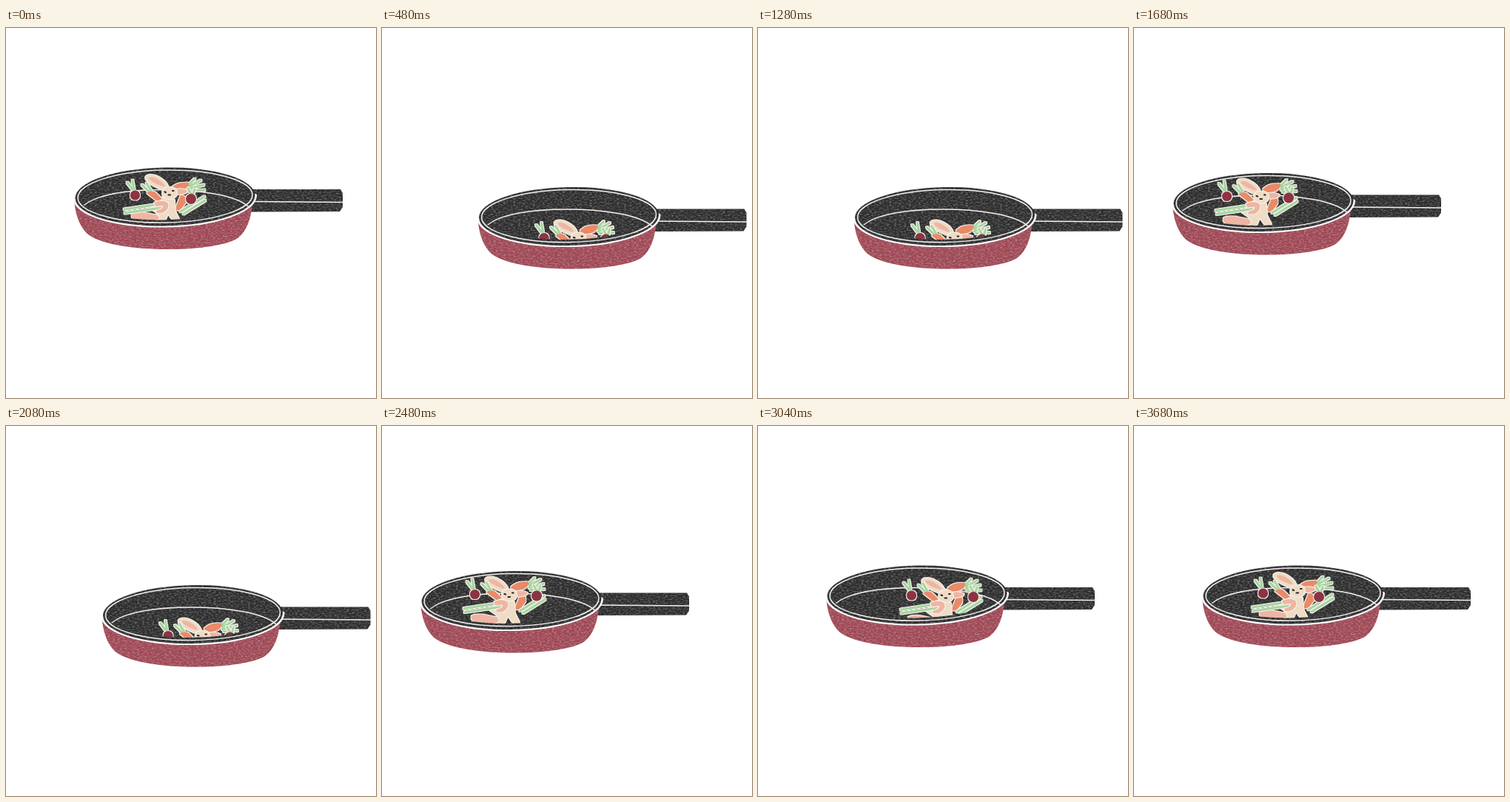
Recreate the animation shown at these times as an HTML page. Size 500 by 500 pixels, loop 3.76 s.

```html
<!DOCTYPE html>
<html lang="en">
<head>
<meta charset="utf-8">
<title>Rabbit stir-fry</title>
<style>
html, body { margin: 0; width: 100%; height: 100%; overflow: hidden; background: #fff; }
svg { display: block; width: 100vw; height: 100vh; }
path { stroke-linecap: round; stroke-linejoin: round; }
.chalk { fill: none; stroke: #f1efed; stroke-width: 1.5; }
.dark { fill: #2b2b2c; }
.cream { fill: #eedcc6; }
.pink { fill: #efb5a3; }
.orange { fill: #e98a69; }
.beet { fill: #8c3344; }
.stem { fill: none; stroke: #a5d5a2; stroke-width: 3; }
.ink { fill: none; stroke: #2a2523; stroke-width: 2.2; }
.cut { filter: url(#cut); }
</style>
</head>
<body>
<svg viewBox="0 0 500 500">
  <defs>
    <filter id="pencil" filterUnits="userSpaceOnUse" x="80" y="180" width="390" height="130" color-interpolation-filters="sRGB">
      <feTurbulence type="fractalNoise" baseFrequency=".3 .6" numOctaves="3" seed="8" result="grain"/>
      <feColorMatrix in="grain" values="0 0 0 0 1  0 0 0 0 1  0 0 0 0 1  .7 0 0 0 -.28" result="light"/>
      <feDisplacementMap in="SourceGraphic" in2="grain" scale="1.2" xChannelSelector="R" yChannelSelector="G" result="shape"/>
      <feComposite in="light" in2="shape" operator="in" result="marks"/>
      <feMerge><feMergeNode in="shape"/><feMergeNode in="marks"/></feMerge>
    </filter>
    <filter id="cut" filterUnits="userSpaceOnUse" x="140" y="180" width="150" height="100" color-interpolation-filters="sRGB">
      <feMorphology in="SourceAlpha" operator="dilate" radius="1" result="wide"/>
      <feFlood flood-color="#f5f0e6"/>
      <feComposite in2="wide" operator="in" result="edge"/>
      <feMerge><feMergeNode in="edge"/><feMergeNode in="SourceGraphic"/></feMerge>
    </filter>
    <clipPath id="inside">
      <path d="M60 120H375V225L332 225.500A117.500 35 -1 0 1 98 229.500L60 230Z"/>
    </clipPath>
  </defs>

  <g id="pan">
    <g filter="url(#pencil)">
      <path class="dark" d="M331 218L452 218L455 223V242L451 248L331 248.500Z"/>
      <path class="chalk" d="M333 234.500L455 235.500"/>
      <path fill="#9d4653" d="M92.500 236C94 252 100 272 114 281C133 293 174 299 219 299C263 299 299 293 313 284C326 274 331 257 333 238Z"/>
      <path fill="none" stroke="#fff" stroke-width="4" d="M337 226A122 39.500 -1 0 1 93 230"/>
      <ellipse cx="215" cy="228" rx="121.500" ry="39.500" transform="rotate(-1 215 228)" class="dark"/>
      <ellipse cx="215" cy="227.500" rx="118" ry="35.500" transform="rotate(-1 215 227.500)" class="chalk"/>
      <path class="chalk" d="M106 239C126 224 169 218.500 213 218.500S309 225 327 241"/>
    </g>

    <g clip-path="url(#inside)">
      <g id="food">
        <g class="cut">
          <path class="stem" d="M247 212L255 204M248 214L263 206M248 217L267 212M250 220L268 219"/>
          <path class="orange" d="M223 216Q232 207 247 209Q248 217 237 220L225 222Z"/>
        </g>
        <path class="cut orange" d="M228 246L236 226Q245 226 243 236L235 247Z"/>
        <path class="cut stem" stroke-width="3.500" d="M236 248L268 228M240 251L269 233"/>
        <g class="cut">
          <path class="stem" d="M171 218L164 209M173 218L171 206"/>
          <circle class="beet" cx="174.500" cy="226" r="6.600"/>
        </g>
        <g id="rabbit">
          <path class="cut cream" d="M210 229Q222 224 228 233L229 248L235 260Q232 265 227 262L219 251L214 263H202L204 250L194 243Z"/>
          <path class="cut pink" d="M170 251Q177 247 190 250L205 253Q209 260 201 261L174 259Q168 256 170 251Z"/>
          <g class="cut">
            <path class="cream" d="M213 219Q190 211 188 202Q192 195 204 200Q217 206 220 216Z"/>
            <path class="pink" d="M212 214Q194 208 193 202Q199 200 206 205Q213 209 215 214Z"/>
          </g>
          <path class="cut pink" d="M226 219Q237 215 246 220Q243 226 227 225Z"/>
          <ellipse class="cut cream" cx="221" cy="223" rx="10" ry="8"/>
          <path class="ink" d="M214.500 221.500L216 222M225 220L226.500 220M219.500 225.500H222"/>
        </g>
        <g class="cut">
          <path class="stem" d="M184 212L193 221M190 210L196 220"/>
          <path class="orange" d="M190 223Q196 219 202 222L211 231L204 234Z"/>
        </g>
        <g class="cut">
          <path class="stem" d="M160 245L207 238M161 250L209 243"/>
        </g>
        <path class="cut pink" d="M200 236Q213 231 219 237Q221 246 211 250L203 250L204 246Q213 245 212 240L202 241Z"/>
        <g id="radish" class="cut">
          <path class="stem" d="M250 224L246 217M253 224L255 218"/>
          <circle class="beet" cx="250" cy="231" r="7"/>
        </g>
      </g>
    </g>
  </g>
</svg>
<script>
const STEP = 80, COUNT = 47, TURN = 10, STOP = 37;

// One shake of the pan, and the food's slide inside it: [x, y] per step
const shake = [[0, 0], [-40, 7.5], [-45, 19], [-28, 31], [8, 38], [34, 33], [37.5, 26.5], [33, 14], [24, 4], [13, 0]];
const slide = [[0, 0], [-9, -6], [-10, -3], [-8, 8], [-4, 19], [2, 28], [7, 31], [16, 25], [18, 14], [11, 5]];

const [panEl, foodEl, rabbitEl, radishEl] =
  ["pan", "food", "rabbit", "radish"].map(id => document.getElementById(id));
const move = (el, [x, y]) => el.setAttribute("transform", `translate(${x} ${y})`);

function pose(k) {
  if (k < STOP) return { pan: shake[k % TURN], food: slide[k % TURN], loose: k ? 1 : 0 };
  if (k === STOP) return { pan: [17, 8], food: [24, 16], loose: 1 };
  const rest = (1 + Math.cos(Math.PI * (k - STOP - 1) / (COUNT - STOP - 2))) / 2;
  return { pan: [0, 0], food: [33 * rest, 3 * rest], loose: rest };
}

let shown = -1;
const start = performance.now();

function draw(now) {
  const k = Math.floor(Math.max(0, now - start) / STEP) % COUNT;
  if (k !== shown) {
    shown = k;
    const { pan, food, loose } = pose(k);
    move(panEl, pan);
    move(foodEl, food);
    move(rabbitEl, [0, 4 * loose]);
    move(radishEl, [8 * loose, -3 * loose]);
  }
  requestAnimationFrame(draw);
}
draw(start);
</script>
</body>
</html>
```
